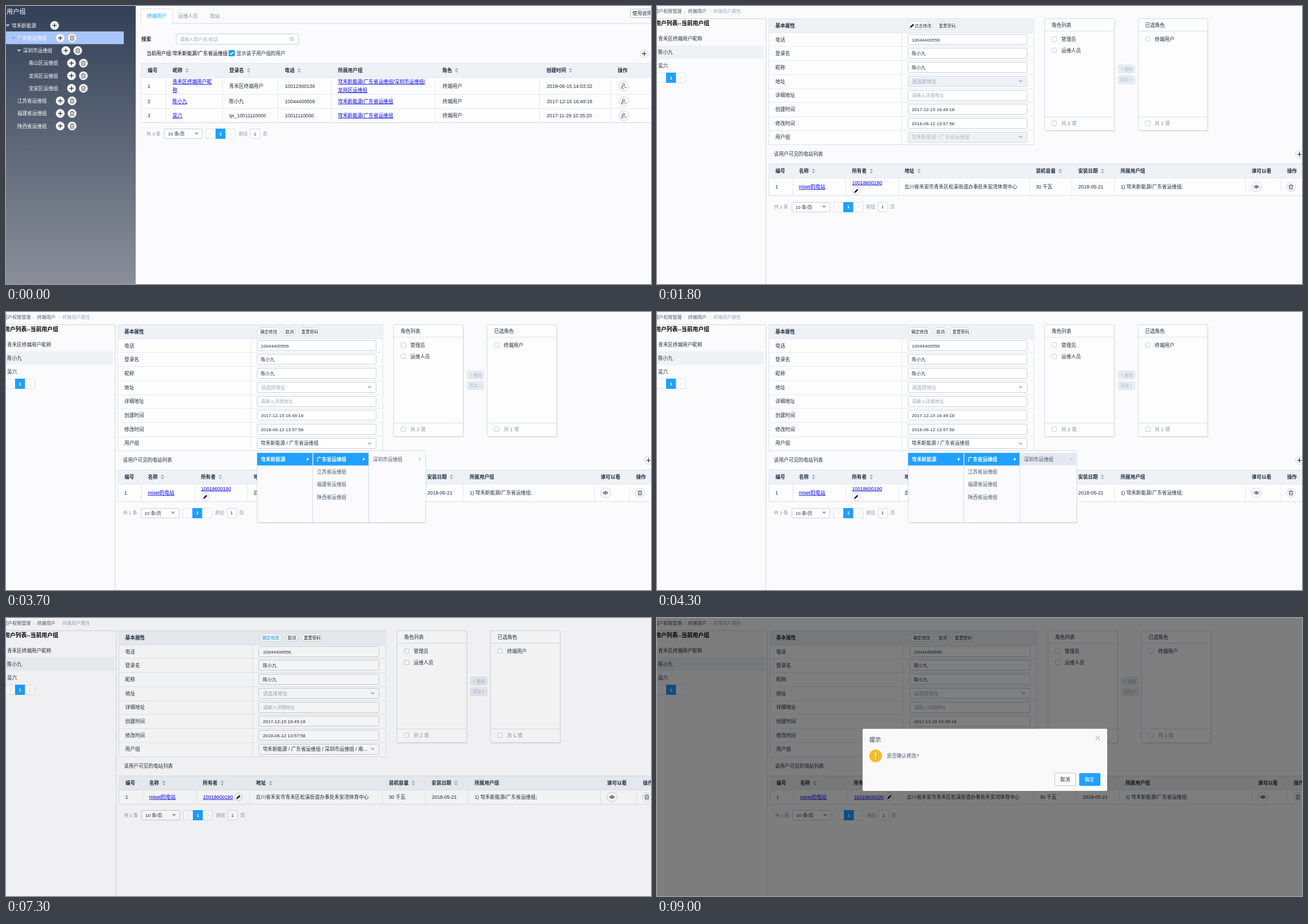
An HTML page for the animation above (9100 ms loop, 1139 px wide and 492 px high).

```html
<!DOCTYPE html>
<html lang="zh-CN">
<head>
<meta charset="utf-8">
<style>
html, body { margin: 0; width: 100%; height: 100%; overflow: hidden; background: #fbfbfd; }
svg { display: block; width: 1139px; height: 492px; }
text { font-family: "Liberation Sans", "Noto Sans CJK SC", "Noto Sans CJK", sans-serif; white-space: pre; }
</style>
</head>
<body>
<svg id="stage" viewBox="0 0 1139 492"></svg>
<script>
const LOOP = 9100, STEP = 100;
const BLUE = '#20a0ff', INK = '#1f2d3d', MUTED = '#8391a5', PALE = '#97a8be';
const LINE = '#e3e8ef', EDGE = '#c6d0dc', HEAD = '#eef1f6', HOVER = '#eff1f5';
const COMPANY = '穹禾新能源', PERSON = '陈小九', PHONE = '10044400556';
const PROVINCE = '广东省运维组', CITY = '深圳市运维组';
const DISTRICTS = ['南山区运维组', '龙岗区运维组', '宝安区运维组'];
const PROVINCES = [PROVINCE, '江苏省运维组', '福建省运维组', '陕西省运维组'];
const NICKNAME = '青禾区终端用户昵称';
const clamp = v => Math.max(0, Math.min(1, v));
const snap = v => Math.floor(v) + .5;

// y is the vertical centre of the line
const text = (x, y, s, fill = INK, size = 8.67, extra = '') =>
  `<text x="${x}" y="${y + size * .36}" font-size="${size}" fill="${fill}" ${extra}>${s}</text>`;
const bold = (x, y, s, fill = INK, size = 8.67) => text(x, y, s, fill, size, 'font-weight="700"');
const link = (x, y, s) => text(x, y, s, '#0000ee', 8.67, 'text-decoration="underline"');
const rect = (x, y, w, h, fill, stroke = 'none', r = 0, extra = '') =>
  `<rect x="${x}" y="${y}" width="${w}" height="${h}" rx="${r}" fill="${fill}" stroke="${stroke}" ${extra}/>`;
const path = (d, stroke, fill = 'none', w = 1) =>
  `<path d="${d}" stroke="${stroke}" fill="${fill}" stroke-width="${w}"/>`;
const hline = (x1, x2, y, c = LINE) => path(`M${x1} ${y}H${x2}`, c);
const vline = (x, y1, y2, c = LINE) => path(`M${x} ${y1}V${y2}`, c);
const circle = (x, y, r, fill = '#fff', stroke = '#c8ccd2') =>
  `<circle cx="${x}" cy="${y}" r="${r}" fill="${fill}" stroke="${stroke}"/>`;
const group = (s, attrs) => `<g ${attrs}>${s}</g>`;
const caret = (x, y, fill = PALE, up = false) =>
  path(up ? `M${x - 4} ${y + 2}h8l-4 -4z` : `M${x - 4} ${y - 2}h8l-4 4z`, 'none', fill);
const chevron = (x, y, dir, c, s = 3) => path(`M${x - dir * s / 2} ${y - s}l${dir * s} ${s}l${-dir * s} ${s}`, c);
const sorter = (x, y) => path(`M${x - 3} ${y - 1}h6l-3 -3z M${x - 3} ${y + 1}h6l-3 3z`, 'none', PALE);
const checkbox = (x, y) => rect(snap(x), snap(y - 4.5), 8, 8, '#fff', EDGE, 1.5);

const plus = (x, y, r = 7.5) => circle(x, y, r) + path(`M${x - 4} ${y}h8M${x} ${y - 4}v8`, '#222', 'none', 1.2);
const trash = (x, y, r = 7.5) => circle(x, y, r) +
  path(`M${x - 4} ${y - 2.5}h8M${x - 1.5} ${y - 4}h3M${x - 3} ${y - 2.5}v6.5h6v-6.5M${x - 1} ${y - .5}v3M${x + 1} ${y - .5}v3`, '#444', 'none', .9);
const pencilMark = (x, y) => path(`M${x - 3.5} ${y + 3.5}l.8 -2.4l4.2 -4.2l1.7 1.7l-4.2 4.2z`, '#222', '#222', .6);
const pencil = (x, y) => circle(x, y, 7) + pencilMark(x, y);
const eye = (x, y) => circle(x, y, 8.5) +
  path(`M${x - 4} ${y}q4 -5 8 0q-4 5 -8 0z`, '#222', 'none', 1.1) + circle(x, y, 1.2, '#222', 'none');
const userMark = (x, y) => circle(x, y, 8.5) + circle(x - .5, y - 2, 2.2, 'none', '#555') +
  path(`M${x - 4.5} ${y + 4}q0 -4 4 -4M${x - 4.5} ${y + 4}h4M${x + 1} ${y + 2.5}h4`, '#555');

function pageButtons(x, y) {
  const left = snap(x);
  return rect(left, snap(y - 8.5), 51, 17, '#fff', '#dde4ec') + rect(left + 16.5, snap(y - 8.5) - .5, 17.5, 18, BLUE) +
    chevron(left + 8.5, y, -1, '#d1dbe5') + chevron(left + 43, y, 1, '#d1dbe5') +
    text(left + 25.5, y, '1', '#fff', 8.1, 'text-anchor="middle" font-weight="700"');
}

function pager(x, y, total) {
  const o = x + (total > 9 ? 4.5 : 0), top = snap(y - 8.5);
  return text(x, y, `共 ${total} 条`, MUTED, 8.1) +
    rect(snap(o + 31.5), top, 67, 17, '#fff', EDGE, 1) + text(o + 38, y + .5, '10 条/页', INK, 8.1) + caret(o + 88.5, y) +
    pageButtons(o + 105.5, y) + text(o + 163, y, '前往', MUTED, 8.1) +
    rect(snap(o + 183.5), top, 17, 17, '#fff', '#d1dbe5', 1) + text(o + 189.5, y, '1', INK, 8.1) + text(o + 205.5, y, '页', MUTED, 8.1);
}

function sidebar() {
  const names = [COMPANY, PROVINCE, CITY, ...DISTRICTS, ...PROVINCES.slice(1)];
  const depth = [0, 1, 2, 3, 3, 3, 1, 1, 1];
  let s = '<defs><linearGradient id="night" x2="0" y2="1"><stop stop-color="#324057"/><stop offset="1" stop-color="#8a8f99"/></linearGradient></defs>' +
    rect(0, 0, 229, 492, 'url(#night)') + rect(0, 45, 208, 22.5, '#a8c6fc') + text(1, 9.5, '用户组', '#fff', 11.3);
  names.forEach((name, i) => {
    const x = 10 + depth[i] * 10, y = 34.4 + i * 22.25;
    s += text(x, y, name, '#fff') + plus(x + 75.7, y);
    if (i) s += trash(x + 96.7, y);
    if (i < 3) s += caret(x - 7, y, i == 1 ? '#92a4c4' : '#b5bdca');
  });
  return s;
}

function userPage(t) {
  const cols = [239, 283, 383, 481, 575, 759, 943, 1069];
  const heads = ['编号', '昵称', '登录名', '电话', '所属用户组', '角色', '创建时间', '操作'];
  const rows = [
    [141.5, NICKNAME, '青禾区终端用户', '10012300136', '2018-06-15 14:03:32'],
    [169, PERSON, PERSON, PHONE, '2017-12-15 16:49:18'],
    [194, '吴六', 'qx_10011110000', '10011110000', '2017-11-29 10:35:20'],
  ];
  let s = sidebar() + hline(238, 1139, 31, '#d1dbe5') +
    path('M238.5 31.5V8q0 -3 3 -3H291q3 0 3 3V31.5', '#d1dbe5', '#fff') +
    text(249, 18, '终端用户', BLUE) + text(304, 18, '运维人员', MUTED) + text(360, 18, '电站', MUTED) +
    rect(1102.5, 5.5, 50, 15, '#fff', '#bbb', 2) + text(1106, 13, '使用说明') +
    bold(239, 59, '搜索') + rect(300.5, 49.5, 216, 18, '#fff', EDGE, 2) + text(307, 59, '请输入用户名/电话', PALE, 8.1) +
    circle(504.5, 58, 2.8, 'none', PALE) + path('M506.5 60l2.5 2.5', PALE) +
    text(248, 83.5, `当前用户组:${COMPANY}/${PROVINCE}`, '#000') + rect(393, 78, 11, 11, BLUE, 'none', 2) +
    path('M395.5 83.5l2.3 2.3l4 -4.3', '#fff', 'none', 1.4) + text(407, 83.5, '显示该子用户组的用户') + plus(1127, 84.5, 7) +
    rect(239, 101.5, 900, 24.5, HEAD) + rect(239, 126, 900, 80.5, '#fdfdfe') +
    rect(239, 157, 900, 24.5, HOVER, 'none', 0, `opacity="${clamp((t - 300) / 400)}"`);
  for (const y of [101.5, 126.5, 156.5, 181.5]) s += hline(239, 1139, y);
  s += hline(239, 1139, 206.5, '#d1d8e2');
  cols.forEach((x, i) => {
    s += vline(x - .5, i ? 126 : 101, 206) + bold(x + 11.3, 114, heads[i]);
    if ([1, 2, 3, 5, 6].includes(i)) s += sorter(x + 19.3 + heads[i].length * 8.67, 114);
  });
  rows.forEach(([y, nick, login, phone, date], i) => {
    s += text(250, y, i + 1) + text(394, y, login) + text(492.5, y, phone) + text(771, y, '终端用户') +
      text(955, y, date) + userMark(1091, y);
    s += i ? link(294, y, nick) + link(586, y, `${COMPANY}/${PROVINCE}`) :
      link(294, 134, nick.slice(0, 8)) + link(294, 149, nick.slice(8)) +
      link(586, 134, `${COMPANY}/${PROVINCE}/${CITY}/`) + link(586, 149, DISTRICTS[1]);
  });
  return s + pager(248, 226, 3);
}

function pill(x, w, s, active, textX = x + 5) {
  return rect(snap(x - .5), 27.5, w, 14, '#fff', active ? '#c4e0f6' : '#d3d7dc', 7) + text(textX, 34.8, s, active ? BLUE : INK, 7.5);
}

function formHover(t) {
  if (t >= 6700 && t < 6900) return 0;
  if (t >= 2700 && t < 3700) return [0, 2, 4, 5, 6, 7][Math.min(5, (t - 2700) / STEP)];
  return -1;
}

function form(t, wide) {
  const fx = x => wide ? x + 1.5 + (x - 198) * .0085 : x;
  const labels = ['电话', '登录名', '昵称', '地址', '详细地址', '创建时间', '修改时间', '用户组'];
  const values = [PHONE, PERSON, PERSON, '请选择地址', '请输入详细地址', '2017-12-15 16:49:18', '2018-06-12 13:57:58'];
  const editing = t >= 2300, hover = formHover(t);
  const left = snap(fx(197.9)), right = snap(fx(665.5)), boxX = snap(fx(443.3)), boxW = snap(fx(653.5)) - boxX;
  let s = rect(left, 22.5, right - left, 223, '#fdfdfe', '#dbe1ea') + rect(left, 23, right - left, 24, HEAD) + bold(fx(209), 34.8, '基本属性');
  labels.forEach((label, i) => {
    const y = 59.4 + i * 24.7, picker = i == 3 || i == 7, off = picker && !editing;
    if (i == hover) s += rect(left, y - 12, right - left, 24, HOVER);
    s += hline(left, right, snap(y - 12.2)) + text(fx(209), y, label) +
      rect(boxX, snap(y - 9.2), boxW, 18, off ? HEAD : '#fff', off ? '#d1dbe5' : i == hover ? '#8391a5' : EDGE, 2);
    if (i < 7) s += text(fx(450), y + .3, values[i], i == 3 || i == 4 ? PALE : INK, i == 3 ? 8.67 : 8.1);
    if (i == 7) {
      const value = `${COMPANY} / ${PROVINCE}` + (t >= 5000 ? ` / ${CITY} / 南…` : '');
      s += text(fx(449.5), y, value, off ? '#b3bac4' : INK);
    }
    if (i == 7 && t >= 2900 && t < 3400) {
      s += circle(642, y, 4, '#bfcbd9', 'none') + path(`M640.5 ${y - 1.5}l3 3m0 -3l-3 3`, '#fff', 'none', .8);
    } else if (picker) s += caret(fx(642), y, '#b5bfcc', i == 7 && t >= 3500 && t < 5000);
  });
  s += vline(snap(fx(432)), 47, 245);
  if (!editing) {
    return s + pill(444, 44, '点击修改', t >= 2000, 454.5) + pencilMark(450.5, 34.8) + pill(494, 37, '重置密码', false, 497.5);
  }
  const active = t < 3400 || (t >= 6900 && t < 7400);
  return s + pill(fx(444), 40, '确定修改', active) + pill(fx(490), 22, '取消', false, fx(490) + 3.3) + pill(fx(518), 37, '重置密码', false, fx(518) + 3.5);
}

function rolePanel(x, title, roles) {
  let s = rect(x + 1, 24, 123, 198, '#8391a5', 'none', 1, 'opacity=".2"') + rect(x, 22.5, 123, 198, '#fdfdfe', '#d1d9e5', 1) +
    hline(x, x + 123, 44.5, '#d8e0e9') + hline(x, x + 123, 196.5, '#d8e0e9') + text(x + 12.5, 34, title) +
    checkbox(x + 13, 208) + text(x + 29.5, 208, `共 ${roles.length} 项`, MUTED);
  roles.forEach((role, i) => s += checkbox(x + 13, 58.8 + i * 19.7) + text(x + 29.5, 58.8 + i * 19.7, role));
  return s;
}

function roles(dx) {
  const ink = '#a8b5c8', x = 814.5 + dx;
  return rolePanel(684.5 + dx, '角色列表', ['管理员', '运维人员']) + rolePanel(849.5 + dx, '已选角色', ['终端用户']) +
    rect(x, 104.5, 29, 14, '#e9edf4', '#d8e0e9', 2) + chevron(x + 6.5, 111.8, -1, ink) + text(x + 10.5, 111.8, '删除', ink, 7.5) +
    rect(x, 123.5, 29, 14, '#e9edf4', '#d8e0e9', 2) + text(x + 3.5, 130.3, '添加', ink, 7.5) + chevron(x + 22.5, 130.3, 1, ink);
}

function stations(t, wide) {
  const tx = x => wide ? x + 1.6 + (x - 198) * .0115 : x;
  const cols = [198, 239.5, 333, 426, 658, 732.5, 807.5, 1039, 1101.5];
  const heads = ['编号', '名称', '所有者', '地址', '装机容量', '安装日期', '所属用户组', '谁可以看', '操作'];
  const loaded = t >= 1300, bottom = !loaded ? 341.5 : wide ? 329.5 : 335.5, y = wide ? 316.7 : 320;
  const left = snap(tx(197.9));
  let s = text(tx(206.5), 261.5, '该用户可见的电站列表') + plus(wide ? 1146 : 1134.5, 262.5, 7) +
    rect(left, 279.5, 960, bottom - 279.5, '#fdfdfe', '#dbe1ea') + rect(left, 280, 960, 24.5, HEAD) + hline(left, 1139, 304.5);
  cols.forEach((x, i) => {
    s += bold(tx(x + 11.2), 292, heads[i]);
    if (i && i < 6) s += sorter(tx(x + 11.2) + heads[i].length * 8.67 + 8.3, 292);
    if (i && loaded) s += vline(snap(tx(x)), 305, bottom);
  });
  if (!loaded) return s + text(657, 323.5, '暂无数据', '#5e6d82') + pager(206.5, 361.5, 10);
  return s + text(tx(209), y, '1') + link(tx(250.5), y, 'miset的电站') + link(tx(344.5), wide ? y : 312.5, '10018600190') +
    (wide ? pencil(410.5, y) : pencil(352, 327)) + text(tx(437), y, '云川省禾安市青禾区松溪街道办事处禾安湾体育中心') +
    text(tx(669), y, '30 千瓦') + text(tx(744), y, '2018-05-21') + text(tx(818.7), y, `1) ${COMPANY}/${PROVINCE};`) +
    eye(tx(1058.5), y) + trash(tx(1119.5), y, 8) + pager(tx(206.5), wide ? 349 : 355.5, 1);
}

function menu(t) {
  const shown = t < 5000 ? clamp((t - 3400) / 300) : clamp(1 - (t - 4900) / 300);
  if (!shown) return '';
  const cityOpen = t >= 4700;
  const columns = [[COMPANY], PROVINCES, [CITY], ...(cityOpen ? [DISTRICTS] : [])];
  const width = columns.length * 99 + 1;
  let s = rect(444, 247, width, 127, '#8391a5', 'none', 2, 'opacity=".25"') + rect(443.5, 245.5, width, 127, '#fbfbfd', '#d1dbe5', 2);
  columns.forEach((items, c) => {
    const x = 443.5 + c * 99;
    if (c) s += vline(x - 1, 246, 372, '#d1dbe5');
    items.forEach((name, i) => {
      const y = 260.5 + i * 22.3, picked = !i && (c < 2 || (c == 2 && cityOpen));
      if (picked) s += rect(x, y - 11.2, 98.5, 22.3, BLUE);
      else if (c == 2) s += rect(x, y - 11.2, 98.5, 22.3, '#e4e8f1', 'none', 0, `opacity="${clamp((t - 4000) / 300)}"`);
      s += (picked ? bold : text)(x + 6.5, y, name, picked ? '#fff' : '#48576a');
      if (c < 3 && !i) s += path(`M${x + 88} ${y - 3}v6l3.5 -3z`, 'none', picked ? '#fff' : '#bfcbd9');
    });
  });
  return group(s, `opacity="${shown}" transform="translate(0 ${245 * (1 - shown)}) scale(1 ${shown})"`);
}

function dialog(t) {
  if (t < 7300) return '';
  const shade = rect(0, 0, 1139, 492, '#000', 'none', 0, `opacity="${Math.min(.5, (t - 7290) / 236)}"`);
  const p = 1 - Math.pow(1 - clamp((t - 7300) / 300), 4.3);
  const confirm = t < 9000 ? '#4db3ff' : BLUE;
  const box = rect(363, 196, 432, 110, '#f9f9f9', 'none', 2) + text(375, 215, '提示', INK, 10.2, 'font-weight="500"') +
    path('M774.5 208.5l8 8m0 -8l-8 8', '#8a919b') +
    circle(386, 244, 11.2, '#f7ba2a', 'none') + path('M386 238v7.5M386 247.8v2.2', '#fff', 'none', 2.2) +
    text(406, 244, '是否确认修改?', '#48576a') +
    rect(702.5, 274.5, 37, 22, '#fcfcfc', '#c4c4c4', 2) + text(712, 286, '取消') +
    rect(745.5, 274.5, 37.5, 22.5, confirm, 'none', 2) + text(755, 286, '确定', '#fff', 8.67, 'font-weight="500"');
  return shade + group(box, `opacity="${p}" transform="translate(0 ${-20 * (1 - p)})"`);
}

function detailPage(t) {
  const wide = t >= 7200, edge = wide ? 194.5 : 192.5;
  return text(-5, 8.7, '用户权限管理', '#48576a', 8.1) + text(48, 8.7, '/', EDGE, 8.1) + text(55, 8.7, '终端用户', '#48576a', 8.1) +
    text(93, 8.7, '/', EDGE, 8.1) + text(99.5, 8.7, '终端用户属性', PALE, 8.1) +
    path(`M0 22.5H${edge}V492`, '#d0d5dd') + bold(-3, 30, '用户列表--当前用户组', '#000', 9.9) +
    rect(0, 69.5, edge - 4, 24, HOVER) +
    text(2, 57.5, NICKNAME) + text(2, 82, PERSON) + text(2, 106, '吴六') + pageButtons(-1, 127.3) +
    form(t, wide) + roles(wide ? 6 : 0) + stations(t, wide) + menu(t) + dialog(t);
}

const stage = document.getElementById('stage');
let drawn = -1;
function draw(now) {
  const t = Math.floor(now % LOOP / STEP) * STEP;
  if (t !== drawn) {
    stage.innerHTML = rect(0, 0, 1139, 492, '#fbfbfd') + (t < 1000 ? userPage(t) : detailPage(t));
    drawn = t;
  }
  requestAnimationFrame(draw);
}
draw(0);
</script>
</body>
</html>
```
